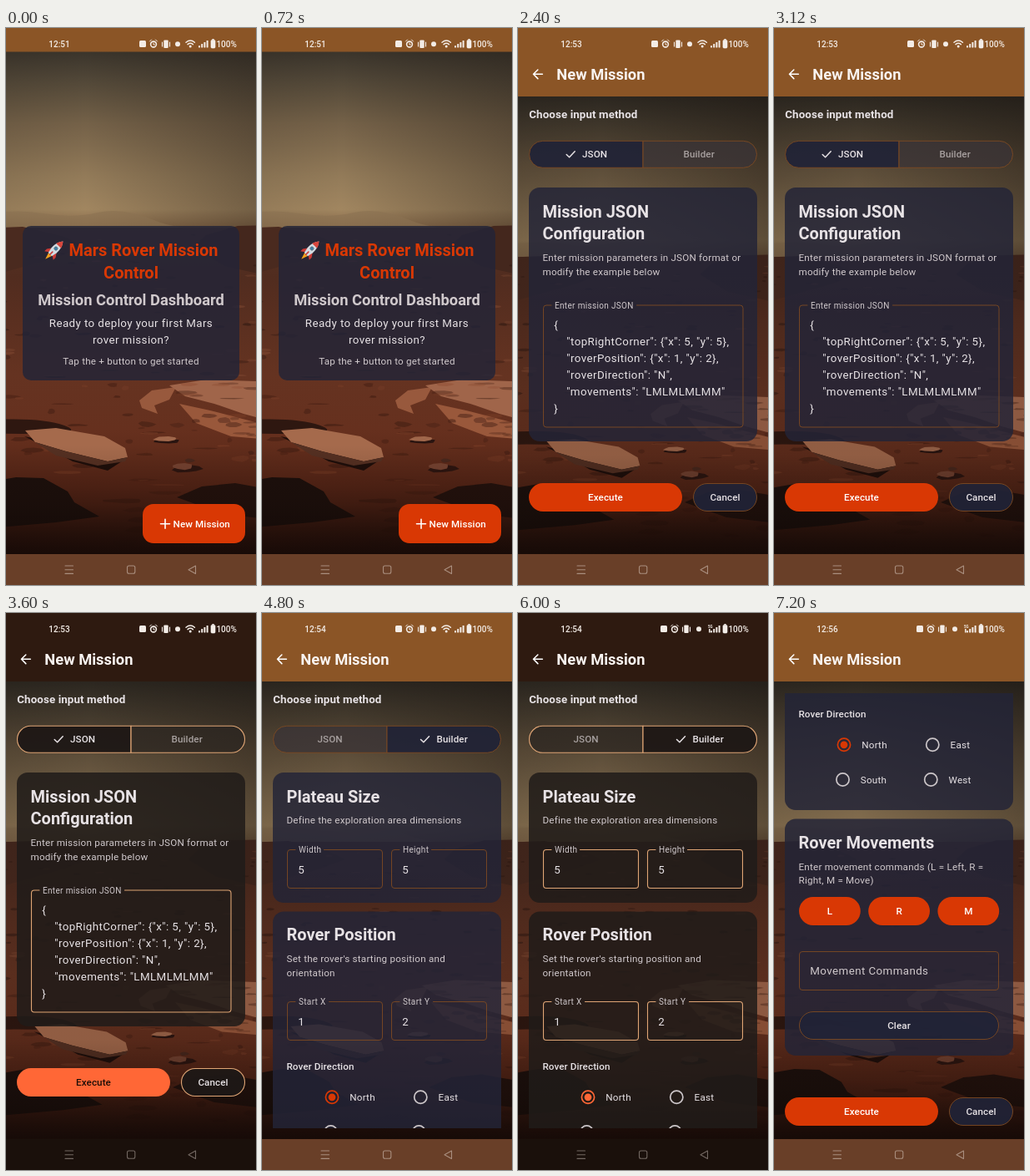
These frames come from a looping animation (300x667 px, 8000 ms). An HTML page:

```html
<!DOCTYPE html>
<html lang="en">
<head>
<meta charset="utf-8">
<title>Rover mission app</title>
<style>
html, body { margin: 0; width: 100%; height: 100%; overflow: hidden; background: #1d110b; }
#view { position: relative; width: 300px; height: 667px; overflow: hidden; }
#strip { position: absolute; left: 0; top: 0; width: 2100px; height: 667px; display: flex; }
#strip svg { flex: none; width: 300px; height: 667px; display: block; }
text { font-family: Roboto, sans-serif; }
.head { font-size: 20px; font-weight: 700; }
.title { font-size: 18.33px; font-weight: 700; }
.sub { font-size: 13.33px; font-weight: 700; letter-spacing: .1px; }
.large { font-size: 13.33px; letter-spacing: .417px; }
.body { font-size: 11.67px; letter-spacing: .208px; }
.label { font-size: 11.67px; font-weight: 500; letter-spacing: .083px; }
.strong { font-size: 11.67px; font-weight: 700; letter-spacing: .083px; }
.small { font-size: 10px; letter-spacing: .333px; }
.clock { font-size: 10px; font-weight: 500; }
.net { font-size: 4.5px; font-weight: 700; }
.mid { text-anchor: middle; }
</style>
</head>
<body>
<div id="view"><div id="strip"></div></div>
<script>
const light = {
  bar: '#8b5526', nav: '#693f28', navIcon: '#a98e7e', card: 'rgba(35,36,55,.84)',
  accent: '#d93804', on: '#fff', line: '#7d4a22', border: .9,
  sel: 'rgba(33,35,54,.93)', unsel: 'rgba(58,52,54,.78)'
};
const dark = {
  bar: '#2e1a10', nav: '#1a100b', navIcon: '#736862', card: 'rgba(32,27,25,.86)',
  accent: '#ff6736', on: '#1c0e08', line: '#dfa575', border: 1.1,
  sel: 'rgba(30,24,22,.95)', unsel: 'rgba(42,36,33,.72)'
};
const INK = '#e7e2e5', SOFT = '#d0c9cc', DIM = '#a7a09f';

const text = (x, y, cls, str, fill = INK) =>
  `<text x="${x}" y="${y}" class="${cls}" fill="${fill}">${str}</text>`;
const rect = (x, y, w, h, r, fill, more = '') =>
  `<rect x="${x}" y="${y}" width="${w}" height="${h}" rx="${r}" fill="${fill}" ${more}/>`;
const path = (d, fill, more = '') => `<path d="${d}" fill="${fill}" ${more}/>`;
const line = (d, color, w = 1) =>
  path(d, 'none', `stroke="${color}" stroke-width="${w}" stroke-linecap="round" stroke-linejoin="round"`);
const circle = (x, y, r, fill, more = '') => `<circle cx="${x}" cy="${y}" r="${r}" fill="${fill}" ${more}/>`;
const group = (more, ...parts) => `<g ${more}>${parts.join('')}</g>`;

// ---- landscape ----
function seeded(s) {
  return () => {
    s = (s + 0x6D2B79F5) | 0;
    let t = Math.imul(s ^ (s >>> 15), 1 | s);
    t = (t + Math.imul(t ^ (t >>> 7), 61 | t)) ^ t;
    return ((t ^ (t >>> 14)) >>> 0) / 4294967296;
  };
}
const rnd = seeded(42);

function stone(x, y, w, h, fill, alpha = 1) {
  let d = '';
  for (let i = 0; i < 9; i++) {
    const a = i / 9 * 2 * Math.PI, k = .7 + rnd() * .4;
    d += (i ? 'L' : 'M') + (x + Math.cos(a) * w * k).toFixed(1) + ' ' + (y + Math.sin(a) * h * k).toFixed(1);
  }
  return path(d + 'z', fill, `opacity="${alpha}"`);
}

function scatter(n, y0, y1, x0, x1, fill, alpha) {
  let out = '';
  for (let i = 0; i < n; i++) {
    const y = y0 + (y1 - y0) * rnd(), near = (y - 215) / 400;
    out += stone(x0 + (x1 - x0) * rnd(), y, 3 + rnd() * 24 * near, .8 + rnd() * 4.5 * near, fill, alpha * (.5 + rnd() * .5));
  }
  return out;
}

const gradient = (id, stops, dir = 'x2="0" y2="1"') =>
  `<linearGradient id="${id}" ${dir}>${stops.map(([o, c, a = 1]) =>
    `<stop offset="${o}" stop-color="${c}" stop-opacity="${a}"/>`).join('')}</linearGradient>`;

const landscape = () => group('id="mars"',
  rect(-30, 28, 360, 215, 0, 'url(#sky)'),
  rect(-30, 28, 360, 215, 0, 'url(#side)'),
  path('M-30 224Q10 216 45 222T110 221T180 231T330 236V245H-30z', '#8b7253', 'opacity=".6"'),
  rect(-30, 239, 360, 391, 0, 'url(#soil)'),
  path('M-30 240L20 238L70 250L95 262L60 275L-30 300z', '#4a2a1f'),
  path('M330 236L278 237L240 248L225 262L262 285L330 300z', '#44271d'),
  scatter(55, 245, 420, -30, 330, '#2c1711', .6),
  scatter(25, 250, 420, -30, 330, '#8a5038', .45),
  path('M160 446L175 434L204 430L196 445L178 452L182 462L163 455z', '#98593d'),
  path('M196 428L240 421L330 424V474L285 462L250 450L215 441z', '#a0654a'),
  path('M208 450L245 458L330 480V494L270 489L228 473z', '#99583b'),
  scatter(18, 425, 490, 200, 330, '#4a2317', .6),
  scatter(45, 425, 620, -30, 330, '#35170e', .5),
  scatter(20, 425, 560, -30, 330, '#8a482e', .4),
  path('M-30 470Q40 465 70 476T20 486T-30 490z', '#2e1710'),
  path('M22 489L60 508L80 519L122 530L145 515L110 506z', '#1e0e0a'),
  path('M23 482L60 479L118 489L143 503L146 514L122 519L72 507L35 496z', '#a56a4c'),
  path('M35 496L72 507L122 519L146 514L143 519L110 524L60 512z', '#553022'),
  stone(193, 495, 18, 3, '#291410'), stone(192, 492, 17, 3, '#a0674b'),
  stone(216, 528, 20, 5, '#2d1510'), stone(212, 525, 14, 4, '#764331'), stone(221, 518, 6, 3, '#4a281d'),
  path('M-30 545L12 538L45 539L74 555L82 568L112 585L60 592L-30 600z', '#1d100c'),
  path('M205 562L235 549L275 545L330 555V590L260 582z', '#24120d'),
  rect(-30, 500, 360, 130, 0, 'url(#foot)'));

const defs = () => '<defs>' +
  gradient('sky', [[0, '#3a342b'], [.15, '#504637'], [.4, '#746148'], [.7, '#937b59'], [.88, '#a18660'], [1, '#806244']]) +
  gradient('side', [[0, '#1f1813', .12], [.35, '#1f1813', 0], [1, '#1f1813', .4]], 'x2="1" y2="0"') +
  gradient('soil', [[0, '#573626'], [.15, '#512c1f'], [.45, '#653321'], [.62, '#66301e'], [.8, '#562516'], [1, '#32150d']]) +
  gradient('foot', [[0, '#0f0705', 0], [.55, '#0f0705', .25], [1, '#0f0705', .75]]) +
  gradient('shade', [[0, '#0d0a08', .32], [.5, '#0d0a08', .12], [1, '#0d0a08', .15]]) +
  '<clipPath id="port"><rect y="96" width="300" height="521"/></clipPath>' +
  landscape() + '</defs>';

// ---- system bars ----
function statusBar(time, wifi) {
  const c = '#f3ece6', [nfc, alarm, buzz, blue] = wifi ? [164, 177, 192, 206] : [175, 188, 202, 217];
  const bars = [0, 1, 2, 3].map(i => rect(231 + i * 3.2, 21 - i * 2, 2, 2.5 + i * 2, .4, c)).join('');
  return text(51.3, 23, 'clock', time, c) +
    rect(nfc - 4, 15, 8, 8, 1.5, c) +
    circle(alarm, 19.5, 3.4, 'none', `stroke="${c}" stroke-width="1.6"`) +
    line(`M${alarm - 4.5} 16l2-2M${alarm + 4.5} 16l-2-2M${alarm} 18v2h1.4`, c) +
    rect(buzz - 2.7, 14.5, 5.4, 9.5, 1, c) +
    line(`M${buzz - 4.5} 17v5M${buzz + 4.5} 17v5`, c, 1.1) +
    circle(blue, 19.3, 3, c) +
    (wifi
      ? line('M216 17.2q5.2-4.4 10.4 0M218 19.6q3.2-2.6 6.4 0', c, 1.5) + circle(221.2, 22, 1.5, c)
      : text(228, 17.5, 'net', '5G', c) + rect(229, 19, 1.6, 4.5, .3, c)) +
    bars + rect(246, 14.5, 5, 9.5, 1.2, c, 'stroke="#fff" stroke-width=".6"') + rect(247.3, 13, 2.4, 1.6, .4, c) +
    text(252.4, 23, 'clock', '100%', c);
}

const navBar = t => rect(0, 630, 300, 37, 0, t.nav) +
  line('M71 644h9.5M71 648.7h9.5M71 653.4h9.5', t.navIcon, 1.1) +
  rect(145.5, 644, 9.3, 9.3, 2, 'none', `stroke="${t.navIcon}" stroke-width="1.1"`) +
  line('M227.5 644v9.4l-8.5-4.7z', t.navIcon, 1.1);

// ---- widgets ----
const check = x => line(`M${x - 4.8} 151.5l3.4 3.3l6.6-7`, INK, 1.5);

const pill = (t, x, y, w, label) =>
  rect(x, y, w, 34, 17, t.accent) + text(x + w / 2, y + 21.2, 'label mid', label, t.on);

const outlined = (t, x, y, w, label) =>
  rect(x + .5, y + .5, w - 1, 33, 16.5, t.sel, `stroke="${t.line}" stroke-width="${t.border}"`) +
  text(x + w / 2, y + 21.2, 'label mid', label);

const actions = (t, y) => pill(t, 13, y, 184, 'Execute') + outlined(t, 210, y, 77, 'Cancel');

function field(t, x, y, w, h, label, gap) {
  const r = 3.5, R = x + w, B = y + h;
  const start = label ? x + gap : x + 9.5;
  return line(`M${start} ${y}H${R - r}q${r} 0 ${r} ${r}V${B - r}q0 ${r} ${-r} ${r}H${x + r}q${-r} 0 ${-r} ${-r}V${y + r}q0 ${-r} ${r} ${-r}H${x + 9.5}`, t.line, t.border) +
    (label ? text(x + 13.5, y + 3.6, 'small', label, SOFT) : '');
}

const entry = (t, x, y, label, gap, value) =>
  field(t, x + .5, y + .5, 114, 46, label, gap) + text(x + 13.3, y + 28.7, 'large', value);

const radio = (t, x, y, label, on) =>
  circle(x, y, 7.6, 'none', `stroke="${on ? t.accent : '#cbc5c8'}" stroke-width="1.7"`) +
  (on ? circle(x, y, 4.4, t.accent) : '') +
  text(x + 21.3, y + 4.2, 'body', label);

function picker(t, builder) {
  const edge = `stroke="${t.line}" stroke-width="${t.border}"`;
  return text(13.3, 108.2, 'sub', 'Choose input method') +
    path('M150 135.3H29.5a16 16 0 0 0 0 32H150z', builder ? t.unsel : t.sel, edge) +
    path('M150 135.3H270.5a16 16 0 0 1 0 32H150z', builder ? t.sel : t.unsel, edge) +
    check(builder ? 195.3 : 63) +
    text(builder ? 66.5 : 77, 155.4, 'label', 'JSON', builder ? DIM : INK) +
    text(builder ? 209.5 : 198.5, 155.4, 'label', 'Builder', builder ? INK : DIM);
}

// ---- screens ----
const rocket = group('transform="translate(58.5 265.5) rotate(45)"',
  path('M-2.6 8L0 16L2.6 8z', '#f6a21b'),
  path('M-4 1L-7.5 6V10L-3 7zM4 1L7.5 6V10L3 7z', '#c93a36'),
  path('M0-14Q5-8 4.4 1L3 8H-3L-4.4 1Q-5-8 0-14z', '#d3dce2'),
  path('M0-14Q3.4-10.5 4.1-6.5H-4.1Q-3.4-10.5 0-14z', '#d8463c'),
  circle(0, -2, 2.1, '#3c7fa8', 'stroke="#62727b" stroke-width=".8"'),
  rect(-.8, 3, 1.6, 6, .8, '#c93a36'));

const home = t => '<use href="#mars"/>' +
  rect(0, 0, 300, 28.5, 0, t.bar) + statusBar('12:51', true) +
  rect(20, 237, 260, 185, 10, t.card) + rocket +
  text(75.5, 273, 'head', 'Mars Rover Mission', t.accent) +
  text(150, 299.5, 'head mid', 'Control', t.accent) +
  text(150, 331.5, 'title mid', 'Mission Control Dashboard', SOFT) +
  text(150, 358.3, 'large mid', 'Ready to deploy your first Mars') +
  text(150, 378.3, 'large mid', 'rover mission?') +
  text(150, 402.5, 'body mid', 'Tap the + button to get started', SOFT) +
  rect(164, 570, 123, 47, 13, t.accent) +
  line('M185.5 593.7h11M191 588.2v11', t.on, 1.6) +
  text(200.6, 598, 'label', 'New Mission', t.on) + navBar(t);

const form = (t, time, wifi, content) =>
  '<use href="#mars" transform="translate(13.5 56.5) scale(.91)"/>' +
  rect(0, 82, 300, 548, 0, 'url(#shade)') + content +
  rect(0, 0, 300, 82, 0, t.bar) + statusBar(time, wifi) +
  line('M29.3 55.3H18.6M23.8 50l-5.3 5.3l5.3 5.3', '#fff', 1.6) +
  text(46.3, 61.7, 'title', 'New Mission', '#f8f3f0') + navBar(t);

const sample = ['"topRightCorner": {"x": 5, "y": 5},', '"roverPosition": {"x": 1, "y": 2},',
  '"roverDirection": "N",', '"movements": "LMLMLMLMM"'];

const jsonForm = (t, time) => form(t, time, true,
  picker(t, false) +
  rect(13, 191, 274, 304, 13, t.card) +
  text(29.5, 226.8, 'head', 'Mission JSON') + text(29.5, 253.4, 'head', 'Configuration') +
  text(29.5, 279, 'body', 'Enter mission parameters in JSON format or', SOFT) +
  text(29.5, 295.8, 'body', 'modify the example below', SOFT) +
  field(t, 30.5, 332, 239.5, 146, 'Enter mission JSON', 112) +
  text(43.3, 359.8, 'large', '{') +
  sample.map((s, i) => text(58.3, 379.8 + i * 20, 'large', s)).join('') +
  text(43.3, 459.8, 'large', '}') +
  actions(t, 545));

const builderForm = (t, time, wifi, scroll) => form(t, time, wifi,
  group('clip-path="url(#port)"', group(`transform="translate(0 ${-scroll})"`,
    picker(t, true),
    rect(13, 191, 274, 156, 13, t.card),
    text(29.5, 226.8, 'head', 'Plateau Size'),
    text(29.5, 252.3, 'body', 'Define the exploration area dimensions', SOFT),
    entry(t, 30, 283, 'Width', 44, '5'), entry(t, 155, 283, 'Height', 48, '5'),
    rect(13, 357.5, 274, 300.5, 13, t.card),
    text(29.5, 392.3, 'head', 'Rover Position'),
    text(29.5, 418, 'body', 'Set the rover\'s starting position and', SOFT),
    text(29.5, 434.8, 'body', 'orientation', SOFT),
    entry(t, 30, 465, 'Start X', 50, '1'), entry(t, 155, 465, 'Start Y', 50, '2'),
    text(29.5, 547, 'label', 'Rover Direction'),
    radio(t, 84, 579.8, 'North', true), radio(t, 190.3, 579.8, 'East'),
    radio(t, 82.5, 621.5, 'South'), radio(t, 188.3, 621.5, 'West'),
    rect(13, 668.5, 274, 283.5, 13, t.card),
    text(29.5, 703.6, 'head', 'Rover Movements'),
    text(29.5, 729.5, 'body', 'Enter movement commands (L = Left, R =', SOFT),
    text(29.5, 746.3, 'body', 'Right, M = Move)', SOFT),
    ...['L', 'R', 'M'].map((s, i) => pill(t, 30 + i * 83.2, 762, 73.8, s)),
    field(t, 30.5, 827.5, 239, 46, ''),
    text(43.3, 855, 'large', 'Movement Commands', SOFT),
    outlined(t, 30, 899, 240, 'Clear'),
    actions(t, 1002))));

const screens = [
  home(light), home(dark),
  jsonForm(light, '12:53'), jsonForm(dark, '12:53'),
  builderForm(light, '12:54', true, 0), builderForm(dark, '12:54', false, 0),
  builderForm(light, '12:56', false, 422)
];

const strip = document.getElementById('strip');
strip.innerHTML = screens.map((s, i) =>
  `<svg viewBox="0 0 300 667">${i ? '' : defs()}${s}</svg>`).join('');

// ---- hard cuts between screens ----
const LOOP = 8000, HOLD = 1200;
const at = i => `translateX(${-300 * i}px)`;
const steps = screens.map((_, i) => ({ offset: i * HOLD / LOOP, transform: at(i), easing: 'step-end' }));
steps.push({ offset: 1, transform: at(screens.length - 1) });
strip.animate(steps, { duration: LOOP, iterations: Infinity });
</script>
</body>
</html>
```
